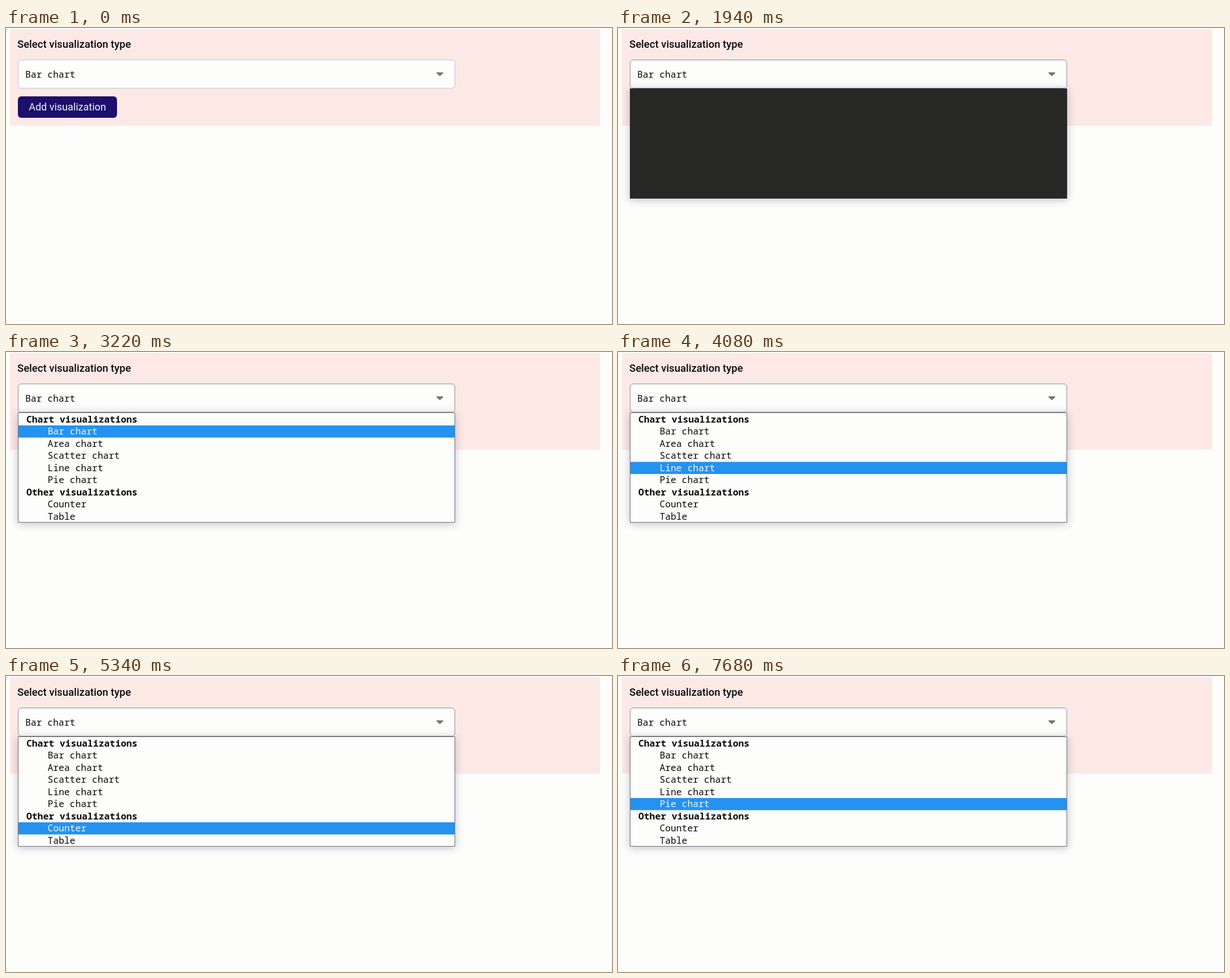
Animation of 1070x524 px, one loop 8000 ms. Source, as an HTML page:

```html
<!DOCTYPE html>
<html lang="en">
<head>
<meta charset="utf-8">
<title>Select visualization type</title>
<style>
  :root { --paper: #fdfdfc; --row-h: 21.5px; --loop: 8s step-end infinite; }
  * { box-sizing: border-box; }
  html, body { margin: 0; width: 100%; height: 100%; overflow: hidden; background: var(--paper); }
  body { position: relative; color: #0a0a0a; font: 18px Roboto, sans-serif; }
  body > *, .menu > * { position: absolute; white-space: pre; }

  .panel { left: 7px; top: 2px; width: 1042px; height: 171px; background: #fce9e6; }
  .title { left: 20px; top: 17px; font-size: 18.5px; font-weight: 500; line-height: 24px; }
  .field, .menu { left: 21px; width: 772px; font: 16.35px "Noto Sans Mono", monospace; }
  .field {
    top: 56px; height: 51px; padding-left: 12px; line-height: 50px;
    border: 1px solid #c3c0d2; border-radius: 6px; background: var(--paper);
    animation: hover var(--loop);
  }
  .field svg { position: absolute; left: 736px; top: 19px; }
  .button {
    left: 21px; top: 121px; width: 175px; height: 38px; border-radius: 6px;
    background: #1d0f6b; color: #f4f2fa; line-height: 38px; text-align: center;
  }

  .menu {
    top: 107px; height: 195px; border: 1px solid #716d70; background: var(--paper);
    box-shadow: 0 2px 14px rgba(50, 42, 95, .3);
    animation: open var(--loop), pick var(--loop);
  }
  .list { left: 0; right: 0; top: .5px; height: calc(9 * var(--row-h)); line-height: var(--row-h); }
  .list div { height: var(--row-h); padding-left: 51.4px; }
  .list .group { padding-left: 14px; font-weight: 700; }
  .lit {
    background: #2492f1; color: #f2f6fb;
    clip-path: inset(calc(var(--row) * var(--row-h)) 0 calc((8 - var(--row)) * var(--row-h)) 0);
  }
  .cover { inset: -1px; background: #282827; animation: cover var(--loop); }

  @keyframes hover { 0% { border-color: #c3c0d2; } 12%, 100% { border-color: #908b92; } }
  @keyframes open { 0% { opacity: 0; } 24.25%, 100% { opacity: 1; } }
  @keyframes cover { 0% { opacity: 1; } 26%, 100% { opacity: 0; } }
  @keyframes pick {
    0% { --row: 1; }
    42% { --row: 2; }
    44% { --row: 3; }
    51% { --row: 4; }
    54.5% { --row: 5; }
    59.5% { --row: 7; }
    63.25% { --row: 8; }
    66.75% { --row: 7; }
    96%, 100% { --row: 5; }
  }
</style>
</head>
<body>
<div class="panel"></div>
<div class="title">Select visualization type</div>
<div class="field">Bar chart<svg width="16" height="12"><path d="M3 3.4H13L8 8Z" fill="#77756f" stroke="#77756f" stroke-width="2" stroke-linejoin="round"/></svg></div>
<div class="button">Add visualization</div>
<div class="menu"><div class="list"><div class="group">Chart visualizations</div><div>Bar chart</div><div>Area chart</div><div>Scatter chart</div><div>Line chart</div><div>Pie chart</div><div class="group">Other visualizations</div><div>Counter</div><div>Table</div></div><div class="cover"></div></div>
<script>
  // The highlighted row is a second, clipped copy of the list.
  const list = document.querySelector('.list');
  const lit = list.cloneNode(true);
  lit.classList.add('lit');
  lit.setAttribute('aria-hidden', 'true');
  list.after(lit);
</script>
</body>
</html>
```
